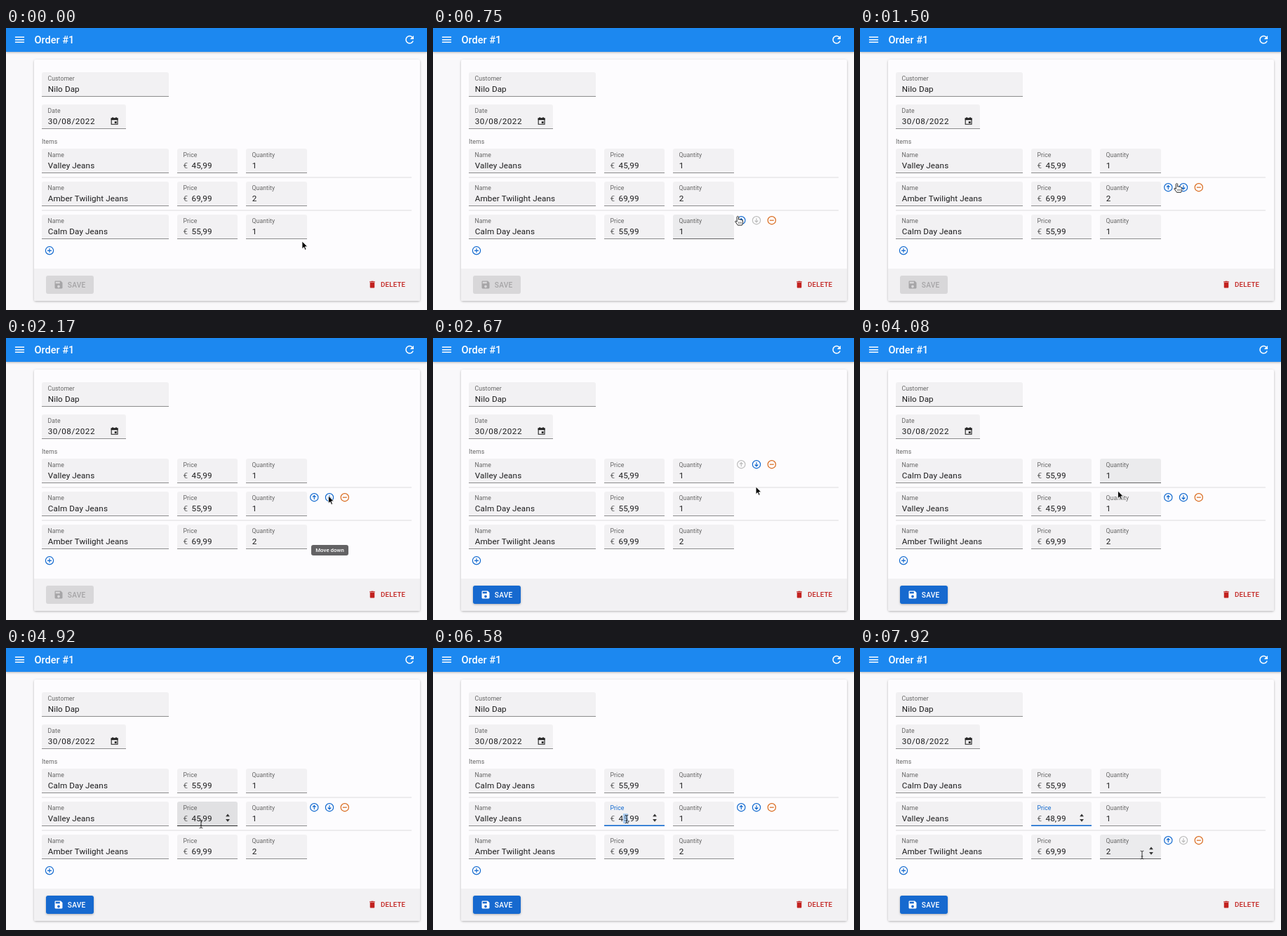
Write an HTML page that moves like this. It is 600 by 402 pixels and loops after 8000 ms.

```html
<!DOCTYPE html>
<html lang="en">
<head>
<meta charset="utf-8">
<title>Order form</title>
<style>
html, body { margin: 0; width: 100%; height: 100%; overflow: hidden; background: #f9f8fa; }
svg { display: block; width: 600px; height: 402px; font-family: Roboto, Arial, sans-serif; }
.label { font-size: 8.7px; letter-spacing: .06px; fill: #666; }
.value { font-size: 11.7px; letter-spacing: .1px; fill: #1c1c1d; white-space: pre; }
.button { font-weight: 500; }
</style>
</head>
<body>
<svg viewBox="0 0 600 402">
  <defs>
    <filter id="shadow" x="-10%" y="-30%" width="120%" height="160%">
      <feDropShadow dx="0" dy="1" stdDeviation="1.4" flood-opacity=".28"/>
    </filter>
  </defs>
  <g id="fixed"></g>
  <g id="live"></g>
</svg>
<script>
const LOOP = 8000;
const BLUE = '#1269cf', ORANGE = '#d9691c', RED = '#c2221f', GREY = '#bdbdbd';
const FIELD = [242, 241, 243], FIELD_HOVER = [225, 225, 227];
const ROW_TOP = 172, ROW_STEP = 47, FIELD_HEIGHT = 35;
const COLUMNS = [
  { key: 'name', label: 'Name', x: 51, width: 181 },
  { key: 'price', label: 'Price', x: 244, width: 86 },
  { key: 'quantity', label: 'Quantity', x: 342, width: 87 }
];
const ACTION_X = [439.3, 461, 482.8];
const ICONS = {
  menu: 'M3 18h18v-2H3zM3 13h18v-2H3zM3 6v2h18V6z',
  refresh: 'M17.65 6.35C16.2 4.9 14.21 4 12 4c-4.42 0-7.99 3.58-7.99 8s3.57 8 7.99 8c3.73 0 6.84-2.55 7.73-6h-2.08c-.82 2.33-3.04 4-5.65 4-3.31 0-6-2.69-6-6s2.69-6 6-6c1.66 0 3.14.69 4.22 1.78L13 11h7V4z',
  save: 'M17 3H5c-1.11 0-2 .9-2 2v14c0 1.1.89 2 2 2h14c1.1 0 2-.9 2-2V7zm-5 16c-1.66 0-3-1.34-3-3s1.34-3 3-3 3 1.34 3 3-1.34 3-3 3zm3-10H5V5h10z',
  trash: 'M6 19c0 1.1.9 2 2 2h8c1.1 0 2-.9 2-2V7H6zM19 4h-3.5l-1-1h-5l-1 1H5v2h14z'
};

const SWAP_LOWER = 2130, SWAP_UPPER = 3410, DIRTY = 2200;
const FOCUS = 5500, SELECT = 6150, TYPE = 7000;

// Pointer stops: time, x, y
const POINTER = [
  [0, 422, 304], [350, 422, 304], [1200, 449, 226], [1500, 451.5, 221.5],
  [1750, 459.5, 225], [2500, 459.5, 225], [2950, 461.5, 184.5], [3650, 461.5, 184.5],
  [4250, 345, 226], [4750, 278, 251], [5100, 278, 251], [5450, 278, 244],
  [6150, 278, 244], [6450, 276, 244], [7400, 276, 244], [7830, 338, 270],
  [7920, 402, 295], [8000, 402, 295]
];

// Tooltip: start, end, row, fades in, fades out
const TOOLTIPS = [
  [1700, SWAP_LOWER, 1, true, false], [SWAP_LOWER, 2480, 2, false, true],
  [3000, SWAP_UPPER, 0, true, false], [SWAP_UPPER, 3660, 1, false, true]
];

const clamp = v => Math.max(0, Math.min(1, v));
const mix = (a, b, k) => a + (b - a) * k;
const mixColor = (a, b, k) => `rgb(${a.map((v, i) => Math.round(mix(v, b[i], k)))})`;
const easeOut = k => 1 - (1 - clamp(k)) ** 3;
const rowY = i => ROW_TOP + i * ROW_STEP;

const rect = (x, y, w, h, fill, extra = '') =>
  `<rect x="${x}" y="${y}" width="${w}" height="${h}" fill="${fill}" ${extra}/>`;
const text = (x, y, content, cls, extra = '') =>
  `<text x="${x}" y="${y}" class="${cls}" ${extra}>${content}</text>`;
const icon = (name, cx, cy, size, fill) =>
  `<path d="${ICONS[name]}" fill="${fill}" transform="translate(${cx - size / 2} ${cy - size / 2}) scale(${size / 24})"/>`;

const GLYPHS = {
  up: 'M0 3V-2.6M-2.3-.3L0-2.7L2.3-.3',
  down: 'M0-3V2.6M-2.3.3L0 2.7L2.3.3',
  minus: 'M-3 0H3',
  plus: 'M-3 0H3M0-3V3'
};
const circleIcon = (glyph, cx, cy, color) =>
  `<g transform="translate(${cx} ${cy})" fill="none" stroke="${color}" stroke-width="1.2"><circle r="5.6"/><path d="${GLYPHS[glyph]}"/></g>`;

function field(x, y, width, label, value, { hover = 0, focus = 0, prefix = '', valueStyle = '' } = {}) {
  const bottom = y + FIELD_HEIGHT;
  const fill = mixColor(FIELD, FIELD_HOVER, hover * (1 - focus));
  const line = mixColor([140, 140, 141], [40, 40, 40], hover);
  const labelColor = focus > .5 ? `fill="${BLUE}" style="fill:${BLUE}"` : '';
  return `<path d="M${x} ${bottom}V${y + 3}q0-3 3-3h${width - 6}q3 0 3 3V${bottom}z" fill="${fill}"/>`
    + rect(x, bottom - 1, width, 1, line)
    + (focus ? rect(x + width * (1 - focus) / 2, bottom - 1.6, width * focus, 1.6, BLUE) : '')
    + text(x + 8.5, y + 12.3, label, 'label', labelColor)
    + (prefix ? text(x + 8.5, y + 27.6, prefix, 'value', 'style="fill:#666"') : '')
    + text(x + (prefix ? 20.5 : 8.8), y + 27.6, value, 'value', valueStyle);
}

function spinner(x, y) {
  return `<path d="M${x - 2.9} ${y + 21.2}l2.9-3.8 2.9 3.8zM${x - 2.9} ${y + 25}l2.9 3.8 2.9-3.8z" fill="#333"/>`;
}

function fixedScene() {
  return rect(0, 0, 600, 402, '#f9f8fa')
    + rect(0, 0, 600, 34, '#1f88f0', 'filter="url(#shadow)"')
    + icon('menu', 19.5, 16.7, 17.5, '#fff')
    + text(40.5, 22, 'Order #1', 'button', 'font-size="14.5" fill="#fff"')
    + icon('refresh', 575.2, 16.7, 17.5, '#fff')
    + rect(40, 45, 550, 344, '#fdfcfe', 'rx="3" filter="url(#shadow)"')
    + `<path d="M40 343H590V386q0 3-3 3H43q-3 0-3-3z" fill="#f2f1f3"/>`
    + field(51, 63, 181, 'Customer', 'Nilo Dap')
    + field(51, 109, 120, 'Date', '30/08/2022', { valueStyle: 'style="letter-spacing:.5px"' })
    + `<path d="M150.2 129h8.8v8.2h-8.8z" fill="none" stroke="#222" stroke-width="1.1"/>`
    + rect(149.7, 128.4, 9.8, 2.8, '#222') + rect(151.6, 127, 1.2, 2, '#222') + rect(156.4, 127, 1.2, 2, '#222')
    + rect(154.8, 133.2, 2.8, 2.7, '#222')
    + text(51, 165, 'Items', 'label')
    + [213, 260].map(y => rect(51, y - .5, 527, 1, '#dedde0')).join('')
    + circleIcon('plus', 62, 317.3, BLUE)
    + icon('trash', 522, 365.7, 13, RED)
    + text(534, 369, 'DELETE', 'button', `font-size="9.7" letter-spacing=".2" fill="${RED}"`);
}

function itemsAt(t) {
  const valley = { name: 'Valley Jeans', price: t < TYPE ? '45,99' : '48,99', quantity: 1 };
  const amber = { name: 'Amber Twilight Jeans', price: '69,99', quantity: 2 };
  const calm = { name: 'Calm Day Jeans', price: '55,99', quantity: 1 };
  if (t < SWAP_LOWER) return [valley, amber, calm];
  return t < SWAP_UPPER ? [valley, calm, amber] : [calm, valley, amber];
}

function pointerAt(t) {
  const i = Math.max(1, POINTER.findIndex(p => p[0] > t));
  const [t0, x0, y0] = POINTER[i - 1], [t1, x1, y1] = POINTER[i];
  const k = clamp((t - t0) / (t1 - t0)), s = k * k * (3 - 2 * k);
  return { x: mix(x0, x1, s), y: mix(y0, y1, s) };
}

const hoveredRow = ({ y }) => y < 166 || y > 303 ? -1 : y < 213 ? 0 : y < 260 ? 1 : 2;
const inField = (p, col, y) =>
  p.x >= col.x && p.x <= col.x + col.width && p.y >= y && p.y <= y + FIELD_HEIGHT;

// Share of the last 200 ms spent over the field
function hoverAmount(t, col, y) {
  let hits = 0;
  for (let ago = 0; ago < 200; ago += 20) hits += inField(pointerAt(Math.max(0, t - ago)), col, y);
  return hits / 10;
}

const actionEnabled = (row, action) => !(row === 0 && action === 0) && !(row === 2 && action === 1);

function actions(row) {
  return ['up', 'down', 'minus'].map((glyph, i) => {
    const color = !actionEnabled(row, i) ? GREY : i === 2 ? ORANGE : BLUE;
    return circleIcon(glyph, ACTION_X[i], rowY(row) + 8.2, color);
  }).join('');
}

function priceEditing(t, y) {
  if (t < FOCUS) return '';
  if (t >= SELECT && t < TYPE) {
    return rect(271, y + 17, 6.8 * clamp((t - SELECT) / 250), 14, '#8bbcf0', 'opacity=".65"');
  }
  const since = t - (t < TYPE ? FOCUS : TYPE);
  return since % 1000 < 500 ? rect(277.7, y + 17, .8, 13, '#222') : '';
}

function itemRow(t, item, row, pointer) {
  const y = rowY(row);
  return COLUMNS.map((col, i) => {
    const focus = row === 1 && i === 1 ? easeOut((t - FOCUS) / 200) : 0;
    const hasSpinner = i > 0 && (focus > 0 || inField(pointer, col, y));
    return field(col.x, y, col.width, col.label, item[col.key],
      { hover: hoverAmount(t, col, y), focus, prefix: i === 1 ? '€' : '' })
      + (hasSpinner ? spinner(col.x + col.width - 14, y) : '');
  }).join('') + (row === 1 ? priceEditing(t, y) : '') + (hoveredRow(pointer) === row ? actions(row) : '');
}

function saveButton(t) {
  const k = easeOut((t - DIRTY) / 250);
  const ink = mixColor([166, 165, 167], [255, 255, 255], k);
  return rect(57, 353, 68, 26, mixColor([216, 215, 217], [18, 105, 207], k),
    `rx="3" ${k > 0 ? 'filter="url(#shadow)"' : ''}`)
    + icon('save', 75, 366, 14.6, ink)
    + text(87.8, 369.8, 'SAVE', 'button', `font-size="10.2" letter-spacing=".2" fill="${ink}"`);
}

function tooltip(t) {
  return TOOLTIPS.map(([start, end, row, fadeIn, fadeOut]) => {
    const rise = fadeIn ? clamp((t - start) / 200) : +(t >= start);
    const fall = fadeOut ? clamp((end + 180 - t) / 180) : +(t < end);
    if (!(rise * fall)) return '';
    const y = rowY(row);
    return `<g opacity="${rise * fall}">` + rect(435, y + 29, 53, 15, '#636264', 'rx="3"')
      + text(461.5, y + 39.4, 'Move down', 'button', 'font-size="7.9" text-anchor="middle" fill="#fff"') + '</g>';
  }).join('');
}

const CURSORS = {
  arrow: '<path d="M0 0V10.8L2.5 8.5 4.2 12.4 6 11.6 4.3 7.8H7.7z" fill="#000" stroke="#fff" stroke-width=".8"/>',
  hand: '<path d="M-1.2.8Q0-.8 1.2.8V4.8Q2.6 3.6 3.6 5 5 4.3 5.6 5.6 7 5.2 7.2 6.6V9Q7 11 6 12.8H0Q-1 11-3.4 8.4-4.2 6.8-2.6 6.9L-1.2 8z" fill="#fff" stroke="#111" stroke-width=".9"/><path d="M1.2 8v2.6M3.1 8v2.6M5 8v2.6" stroke="#111" stroke-width=".6"/>',
  beam: '<path d="M-2.3-5.8Q0-5.8 0-4.3V4.3Q0 5.8-2.3 5.8M2.3-5.8Q0-5.8 0-4.3M0 4.3Q0 5.8 2.3 5.8M-1.3 2H1.3" fill="none" stroke="#222" stroke-width=".9"/>'
};

function cursorKind(t, pointer) {
  const row = hoveredRow(pointer);
  if (row < 0 || (t >= SWAP_LOWER && t < 2400)) return 'arrow';
  const y = rowY(row);
  if (COLUMNS.some(col => inField(pointer, col, y))) return 'beam';
  const action = ACTION_X.findIndex(x => Math.abs(pointer.x - x) <= 10.9);
  const onAction = action >= 0 && Math.abs(pointer.y - y - 8.2) <= 8.5;
  return onAction && actionEnabled(row, action) ? 'hand' : 'arrow';
}

const live = document.getElementById('live');
document.getElementById('fixed').innerHTML = fixedScene();

function draw(t) {
  const pointer = pointerAt(t);
  live.innerHTML = itemsAt(t).map((item, row) => itemRow(t, item, row, pointer)).join('')
    + saveButton(t) + tooltip(t)
    + `<g transform="translate(${pointer.x} ${pointer.y})">${CURSORS[cursorKind(t, pointer)]}</g>`;
}

const began = performance.now();
function tick() {
  draw((performance.now() - began) % LOOP);
  requestAnimationFrame(tick);
}
tick();
</script>
</body>
</html>
```
